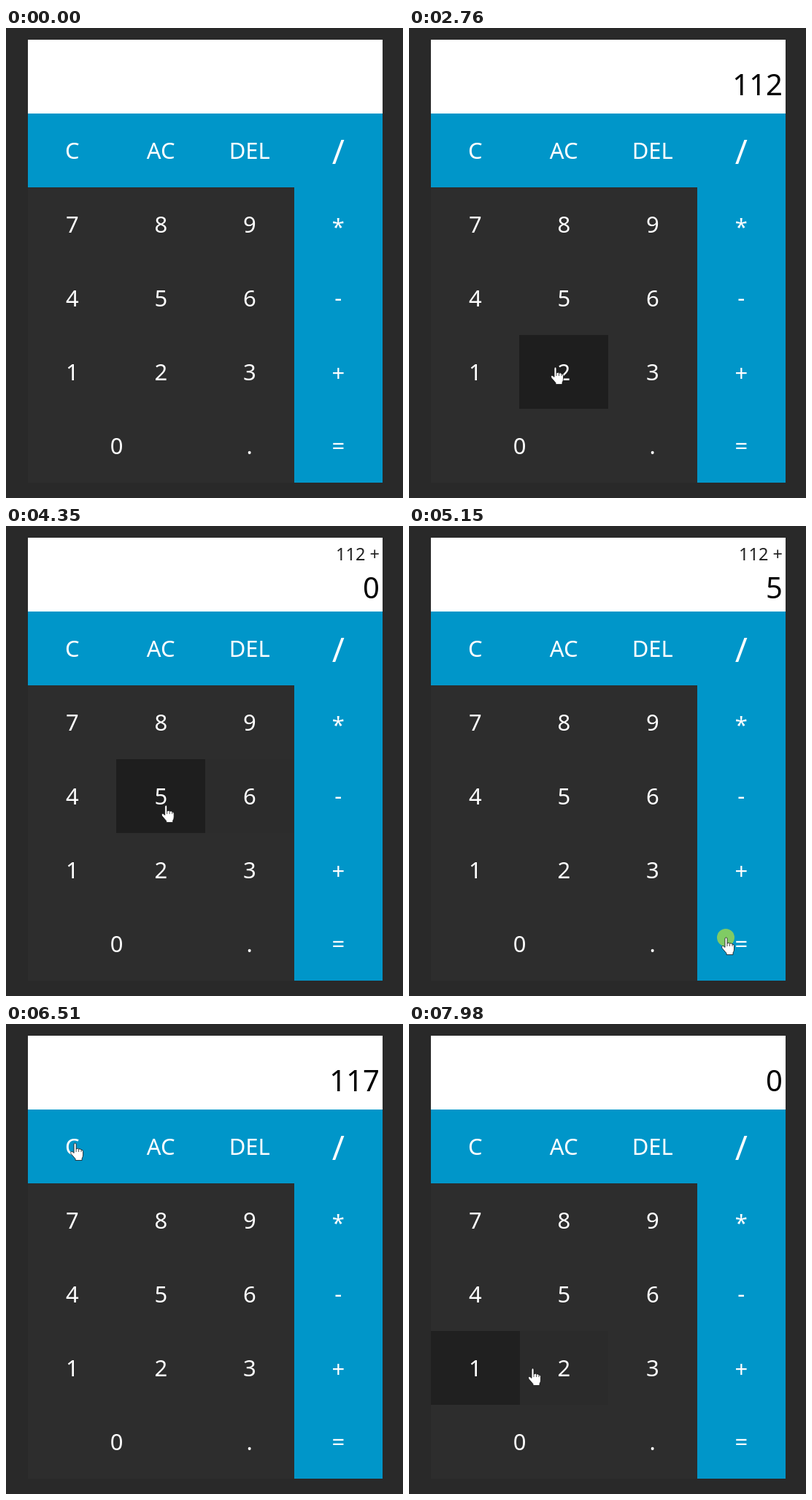
Recreate the animation shown at these times as an HTML page. Size 544x643 px, loop 8000 ms.

```html
<!DOCTYPE html>
<html lang="en">
<head>
<meta charset="utf-8">
<title>Calculator</title>
<style>
html, body { margin: 0; width: 100%; height: 100%; overflow: hidden; background: #292929; }
svg { display: block; }
text { font-family: "Noto Sans", "Open Sans", sans-serif; }
.key { font-size: 31px; fill: #fff; text-anchor: middle; }
.num { font-weight: 500; }
.out { text-anchor: end; }
</style>
</head>
<body>
<svg id="stage" width="544" height="643" viewBox="0 0 544 643">
  <rect width="544" height="643" fill="#292929"/>
  <rect x="30" y="16" width="486" height="101" fill="#fff"/>
  <rect x="30" y="218" width="365" height="404" fill="#2d2d2d"/>
  <path d="M30 117H516V622H395V218H30Z" fill="#0096c9"/>
  <g id="keys"></g>
  <text id="expr" class="out" x="512" y="47" font-size="23.5" fill="#222"></text>
  <text id="value" class="out" x="512" y="92" font-size="40"></text>
  <g id="cursor">
    <circle id="ring" r="12" fill="#ff0" fill-opacity=".5"/>
    <path fill="#fff" stroke="#111" stroke-width=".8" d="M-1 2Q-1 0 .5 0Q2 0 2 2V8Q5 6.5 5.5 8Q8.5 7.5 9 9Q11.5 9 11.5 11.5V16Q11.5 18.5 10 21V23.5H1V21.5L-5 14.5Q-6 12 -4.5 11.5Q-3 11-1 13.5Z"/>
    <path fill="none" stroke="#222" stroke-width=".8" d="M2 8v4M5.5 8v4M9 9v3"/>
  </g>
</svg>
<script>
const LOOP = 8000, FADE = 220;
const $ = id => document.getElementById(id);
const smooth = u => u * u * (3 - 2 * u);

function add(parent, tag, attrs, text = '') {
  const el = document.createElementNS('http://www.w3.org/2000/svg', tag);
  for (const k in attrs) el.setAttribute(k, attrs[k]);
  el.textContent = text;
  parent.append(el);
  return el;
}

// Keys: dark number keys get a shade that fades in under the cursor.
const rows = ['C AC DEL /', '7 8 9 *', '4 5 6 -', '1 2 3 +', '0  . ='].map(r => r.split(' '));
const shift = { '*': 3, '-': -1, '+': 1, '/': 6.5 };
const cells = [];
rows.forEach((row, r) => row.forEach((label, c) => {
  if (!label) return;
  const x = 30 + 121.5 * c, y = 117 + 101 * r, w = label === '0' ? 243 : 121.5;
  if (r && c < 3) {
    const left = Math.floor(x), right = Math.round(x + w);
    const el = add($('keys'), 'rect',
      { x: left, y, width: right - left, height: 101, fill: '#1e1e1e', opacity: 0 });
    cells.push({ el, x, y, w });
  }
  const t = add($('keys'), 'text',
    { class: r ? 'key num' : 'key', x: x + w / 2, y: y + 62 + (shift[label] || 0) }, label);
  if (label === '/') t.style.fontSize = '46px';
}));

// Cursor strokes: evenly timed points on a smooth curve, at rest in between.
const stroke = (from, to, ...pts) => ({ from, to, pts });
const strokes = [
  stroke(170, 480, [440, 650], [230, 540], [110, 524], [56, 559]),
  stroke(670, 1020, [56, 559], [144, 505], [90, 461], [75, 466]),
  stroke(1700, 2020, [75, 466], [200, 464]),
  stroke(2760, 3550, [200, 464], [320, 320], [455, 262], [470, 345], [437, 458]),
  stroke(3790, 4370, [437, 458], [310, 400], [218, 382]),
  stroke(4640, 4970, [218, 382], [434, 563]),
  stroke(5850, 6610, [434, 563], [254, 279], [140, 195], [92, 162], [90, 160], [102, 169]),
  stroke(7230, 7980, [102, 169], [128, 420], [320, 475], [250, 555], [85, 515], [90, 472], [169, 471])
];

function cursorAt(t) {
  const s = strokes.filter(s => t >= s.from).pop();
  if (!s) return null;
  const n = s.pts.length - 1;
  const v = Math.min(1, (t - s.from) / (s.to - s.from)) * n;
  const i = Math.min(n - 1, Math.floor(v)), u = v - i;
  const slope = (j, k) => j > 0 && j < n ? (s.pts[j + 1][k] - s.pts[j - 1][k]) / 2 : 0;
  return [0, 1].map(k => {
    const a = s.pts[i][k], b = s.pts[i + 1][k];
    return a + (b - a) * smooth(u)
      + u * (1 - u) * ((1 - u) * slope(i, k) - u * slope(i + 1, k));
  });
}

// Presses: down, up, value, expression
const presses = [
  [1230, 1330, '1', ''], [1470, 1570, '11', ''], [2360, 2440, '112', ''],
  [3610, 3710, '0', '112 +'], [4450, 4530, '5', '112 +'],
  [5110, 5190, '117', ''], [6790, 6870, '0', '']
];

function render(t) {
  const pos = cursorAt(t);
  $('cursor').style.display = pos ? '' : 'none';
  if (pos) $('cursor').setAttribute('transform', `translate(${pos[0]} ${pos[1]})`);

  const down = presses.some(p => t >= p[0] && t < p[1]);
  $('ring').style.display = down ? '' : 'none';
  const [, , value, expr] = presses.filter(p => t >= p[1]).pop() || [0, 0, '', ''];
  $('value').textContent = value;
  $('value').setAttribute('y', expr ? 98.5 : 92);
  $('expr').textContent = expr;

  // Shade = share of the last FADE ms spent over the key.
  const trail = [];
  for (let k = 0; k < FADE; k += 10) trail.push(cursorAt(t - k));
  for (const c of cells) {
    const hits = trail.filter(p => p && p[0] >= c.x && p[0] < c.x + c.w
      && p[1] >= c.y && p[1] < c.y + 101).length;
    c.el.setAttribute('opacity', smooth(hits / trail.length));
  }
}

const start = performance.now();
function tick() {
  render((performance.now() - start) % LOOP);
  requestAnimationFrame(tick);
}
tick();
</script>
</body>
</html>
```
